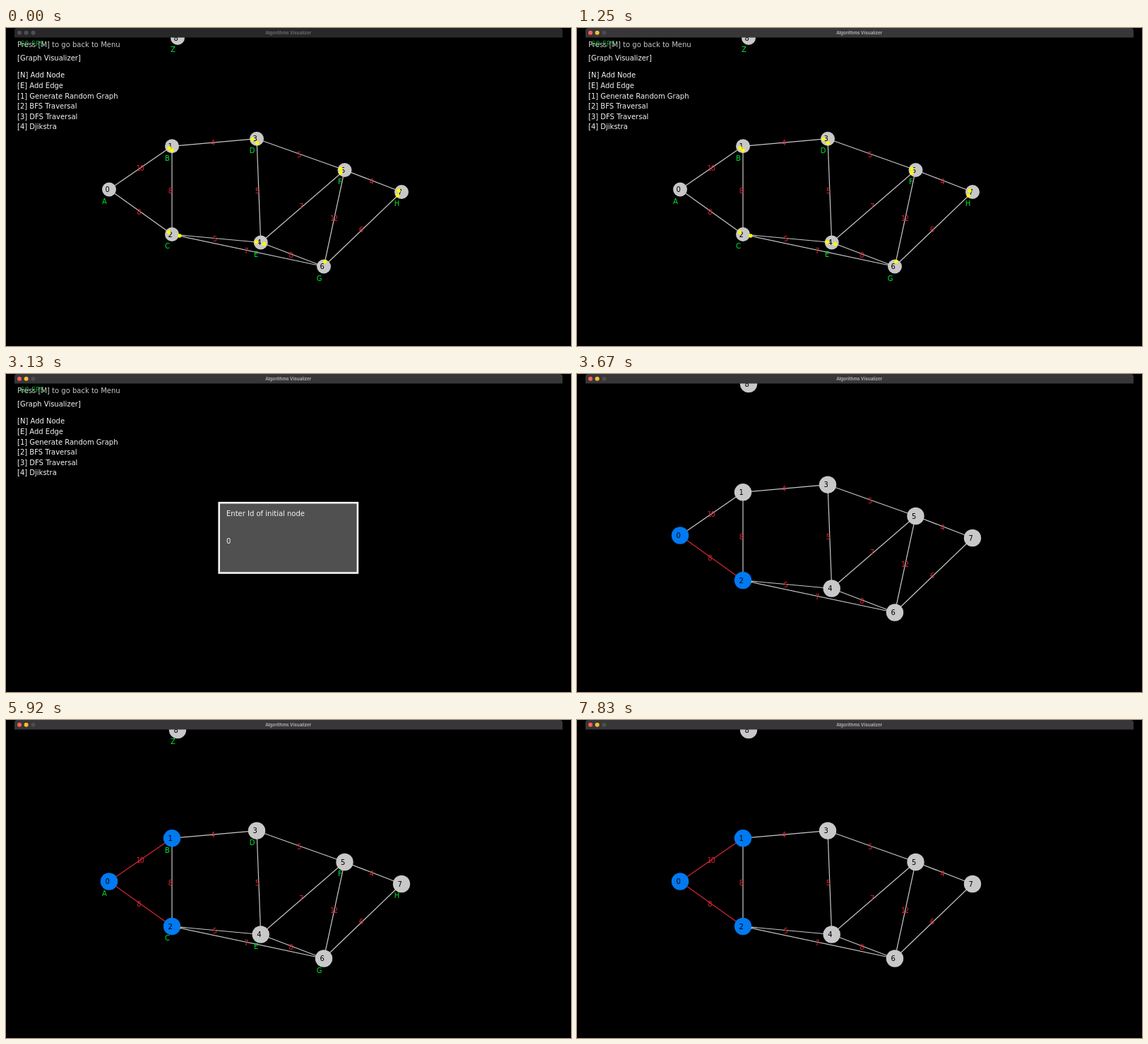
These frames come from a looping animation (800 by 450 pixels, 8000 ms). An HTML page:

```html
<!DOCTYPE html>
<html lang="en">
<head>
<meta charset="utf-8">
<title>Graph traversal</title>
<style>
  html, body { margin: 0; width: 100%; height: 100%; overflow: hidden; background: #000; }
  svg { display: block; width: 100vw; height: 100vh; }
  text { font: 10px "DejaVu Sans", sans-serif; }
  .title { font: 600 6.3px Inter, sans-serif; text-anchor: middle; }
  .mid { text-anchor: middle; }
</style>
</head>
<body>
<svg id="stage" viewBox="0 0 800 450"></svg>
<script>
const LOOP = 8000;
const GRAY = '#c8c8c8', RED = '#d62636', BLUE = '#0079f1', GREEN = '#00e430', YELLOW = '#fdf900', WHITE = '#f5f5f5';

// Moments at which the scene switches
const FOCUS = 1080, POPUP = 2170, TYPED = 3040, RUN = 3670, STEP = 5330, HIDE = 7750;

const nodes = {
  A: [146, 228.5, 0], B: [235, 167.3, 1], C: [235, 292, 2], D: [355, 156.7, 3],
  E: [360.7, 303.5, 4], F: [479.5, 201, 5], G: [450, 337.5, 6], H: [560, 232, 7], Z: [243, 14, 8]
};
// from, to, weight, direction dot
const edges = [
  ['A', 'B', 10, 231, 170], ['A', 'C', 8, 230.5, 289], ['B', 'C', 8, 235, 173],
  ['B', 'D', 4, 349, 157.3], ['D', 'E', 5, 355.5, 163], ['D', 'F', 5, 474, 199.3],
  ['E', 'F', 7, 474, 205], ['F', 'G', 12, 451.7, 330.5], ['F', 'H', 4, 556, 230.3],
  ['G', 'H', 6, 554.3, 237], ['C', 'E', 5, 354.5, 303], ['C', 'G', 7, 245.8, 294],
  ['E', 'G', 8, 365.5, 305.7]
];
const menu = [
  '[N] Add Node', '[E] Add Edge', '[1] Generate Random Graph',
  '[2] BFS Traversal', '[3] DFS Traversal', '[4] Djikstra'
];

const stage = document.getElementById('stage');

function add(parent, tag, attrs = {}, content) {
  const el = document.createElementNS('http://www.w3.org/2000/svg', tag);
  for (const key in attrs) el.setAttribute(key, attrs[key]);
  if (content !== undefined) el.textContent = content;
  parent.appendChild(el);
  return el;
}
const group = parent => add(parent, 'g');
const label = (parent, x, y, str, fill, extra) => add(parent, 'text', { x, y, fill, ...extra }, str);
const disc = (parent, cx, cy, r, fill) => add(parent, 'circle', { cx, cy, r, fill });
const show = (el, on) => el.setAttribute('visibility', on ? 'visible' : 'hidden');

function mix(a, b, k) {
  return `rgb(${a.map((v, i) => Math.round(v + (b[i] - v) * k))})`;
}

add(stage, 'rect', { width: 800, height: 450 });

// Graph
const graph = group(stage);
const lineLayer = group(graph);
const backDots = group(graph);
const discLayer = group(graph);
const digitLayer = group(graph);
const frontDots = group(graph);
const weightLayer = group(graph);
const letterLayer = group(graph);
const lines = {}, discs = {};

for (const [from, to, weight, dx, dy] of edges) {
  const [x1, y1] = nodes[from], [x2, y2] = nodes[to];
  lines[from + to] = add(lineLayer, 'line', { x1, y1, x2, y2, stroke: GRAY, 'stroke-width': 1.2 });
  disc(backDots, dx, dy, 2, YELLOW);
  disc(frontDots, dx, dy, 2.7, YELLOW);
  const wide = weight > 9;
  label(weightLayer, (x1 + x2) / 2 - (wide ? 1 : 2), (y1 + y2) / 2 + 4, weight, RED,
    { class: 'mid', 'letter-spacing': wide ? -1.3 : 0 });
}
for (const id in nodes) {
  const [x, y, n] = nodes[id];
  discs[id] = disc(discLayer, x, y, 10, GRAY);
  label(digitLayer, x - 2.3, y + 3.7, n, '#000', { class: 'mid' });
  label(letterLayer, x - 6.5, y + 20.3, id, GREEN, { class: 'mid' });
}

// Menu
const menuLayer = group(stage);
label(menuLayer, 20, 26, '60 FPS', '#009e2f');
label(menuLayer, 16, 26.5, 'Press [M] to go back to Menu', GRAY);
label(menuLayer, 16, 46, '[Graph Visualizer]', WHITE);
menu.forEach((str, i) => label(menuLayer, 16, 70.3 + i * 14.6, str, WHITE));

// Dialog
const popup = group(stage);
add(popup, 'rect', { x: 301.7, y: 182.2, width: 196.2, height: 99.3, fill: '#505050', stroke: WHITE, 'stroke-width': 2.6 });
label(popup, 312, 201, 'Enter Id of initial node', WHITE);
const typed = label(popup, 312, 240, '0', WHITE);

// Window bar
const bar = add(stage, 'path', { d: 'M12 13.5V4Q12 0 16 0H784Q788 0 788 4V13.5Z' });
const lights = [19, 28.6, 38.5].map(x => disc(stage, x, 6.7, 3, '#555'));
const lit = [[255, 95, 87], [254, 188, 46], [75, 78, 75]];
const title = label(stage, 399.7, 9, 'Algorithms Visualizer', GRAY, { class: 'title' });

function draw(t) {
  const focus = Math.min(1, Math.max(0, (t - FOCUS + 42) / 212));
  bar.setAttribute('fill', mix([40, 39, 41], [56, 54, 57], focus));
  title.setAttribute('fill', mix([112, 111, 113], [184, 183, 185], focus));
  lights.forEach((el, i) => el.setAttribute('fill', mix([80, 78, 80], lit[i], focus)));

  const asking = t >= POPUP && t < RUN;
  const running = t >= RUN;
  const stepped = t >= STEP;
  show(graph, !asking);
  show(menuLayer, !running);
  show(popup, asking);
  show(typed, asking && t >= TYPED);
  if (asking) {
    for (const el of [letterLayer, frontDots, backDots]) show(el, false);
    return;
  }

  show(letterLayer, !running || (stepped && t < HIDE));
  show(frontDots, !running);
  show(backDots, running);
  for (const id in discs) {
    const visited = running && (id === 'A' || id === 'C' || (id === 'B' && stepped));
    discs[id].setAttribute('r', running ? 12.2 : 10);
    discs[id].setAttribute('fill', visited ? BLUE : GRAY);
  }
  lines.AC.setAttribute('stroke', running ? RED : GRAY);
  lines.AB.setAttribute('stroke', stepped ? RED : GRAY);
}

const start = performance.now();
function tick() {
  draw((performance.now() - start) % LOOP);
  requestAnimationFrame(tick);
}
draw(0);
requestAnimationFrame(tick);
</script>
</body>
</html>
```
